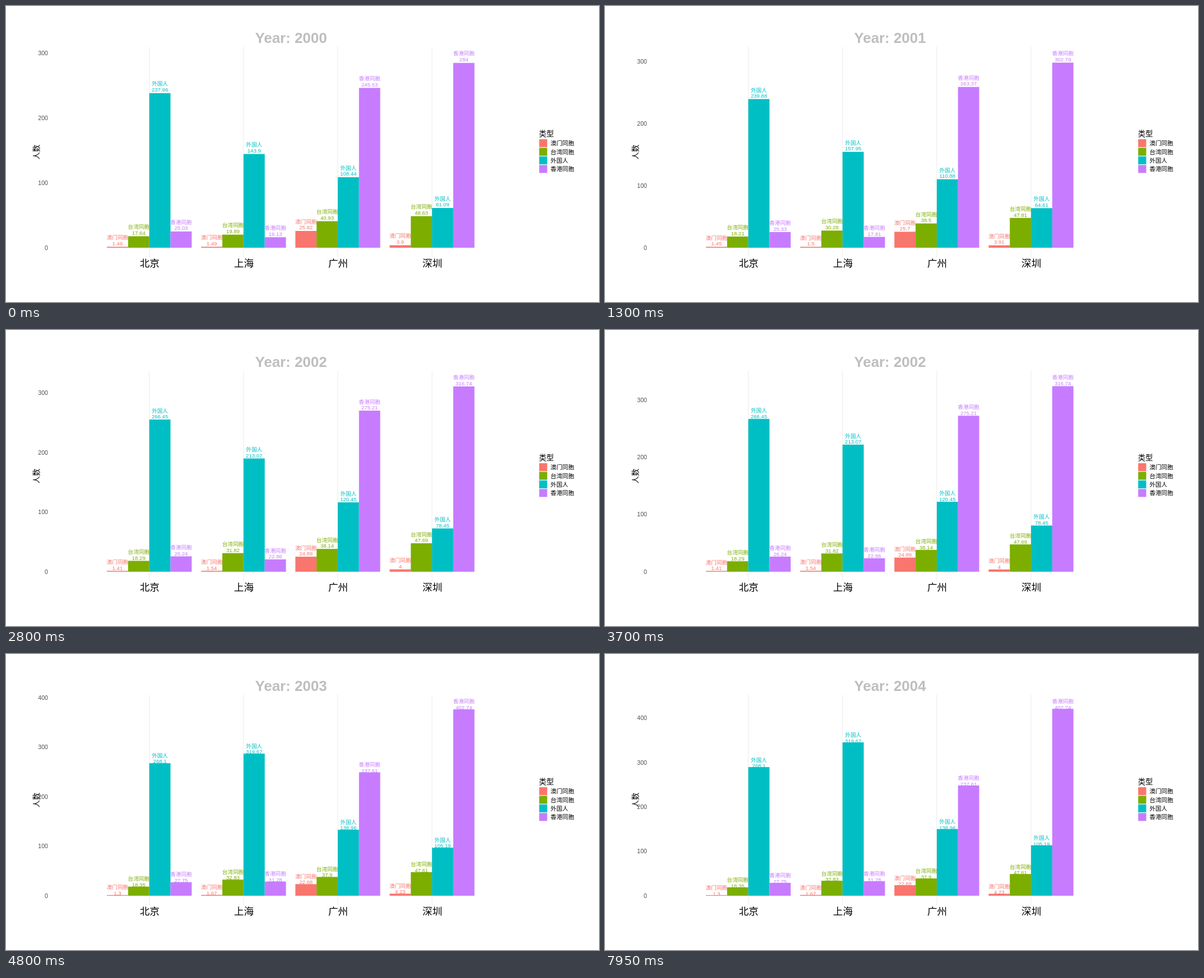
Recreate the animation shown at these times as an HTML page with a canvas. Size 1058x529 px, loop 8000 ms.

```html
<!DOCTYPE html>
<html lang="zh">
<head>
<meta charset="utf-8">
<title>人数</title>
<style>
  html, body { margin: 0; width: 100%; height: 100%; overflow: hidden; background: #fff; }
  canvas { display: block; }
</style>
</head>
<body>
<canvas id="stage" width="1058" height="529"></canvas>
<script>
const ctx = document.getElementById('stage').getContext('2d');

const LOOP = 8000, STEP = 50, STEPS_PER_YEAR = 36, LEAD = 0.95;
const BASE = 432, TOP = 90.1, PANEL_TOP = 72.7, PANEL_BOTTOM = 448.8;
const FIRST_X = 255.65, GROUP_GAP = 168.15, BAR_W = 37.83;
const LABEL_LIFT = 10, LAST_YEAR = 3;
const SANS = '"Liberation Sans", Arial, sans-serif';
const CJK = '"Noto Sans CJK SC", "Noto Sans CJK", "Noto Sans CJK JP", sans-serif';

// bend: how late a change comes; growth: rise after the flat year.
const types = [
  { name: '澳门同胞', color: '#F8766D', bend: 3, growth: 1.1 },
  { name: '台湾同胞', color: '#7CAE00', bend: 0.2, growth: 1.06 },
  { name: '外国人', color: '#00BFC4', bend: 2.3, growth: 1.18 },
  { name: '香港同胞', color: '#C77CFF', bend: 2, growth: 1.1 }
];

// Key points per type, spread evenly from 2000 to 2003.
const cities = [
  { name: '北京', keys: [[1.46, 1.3], [17.64, 18.35], [237.96, 239.88, 266.45, 268.1], [25.03, 27.75]] },
  { name: '上海', keys: [[1.49, 1.67], [19.89, 32.83], [143.9, 319.67], [16.13, 31.28]] },
  { name: '广州', keys: [[25.82, 22.68], [40.93, 37.9], [108.44, 138.96], [245.53, 263.37, 275.21, 237.61]] },
  { name: '深圳', keys: [[3.9, 4.23], [48.63, 47.61], [61.09, 105.19], [284, 302.79, 316.74, 402.74]] }
];

const mix = (a, b, part) => a + (b - a) * part;

// Value in a whole year: the year after the last key is flat, then it grows.
function yearValue(keys, type, year) {
  const at = Math.min(year, LAST_YEAR) * (keys.length - 1) / LAST_YEAR;
  const i = Math.floor(at);
  const value = mix(keys[i], keys[i + 1] ?? keys[i], (at - i) ** type.bend);
  return year > LAST_YEAR + 1 ? value * type.growth : value;
}

function text(str, x, y, size, color, align = 'center', family = SANS, weight = '') {
  ctx.font = `${weight} ${size}px ${family}`;
  ctx.fillStyle = color;
  ctx.textAlign = align;
  ctx.fillText(str, x, y);
}

function rect(x, y, w, h, color) {
  ctx.fillStyle = color;
  ctx.fillRect(x, y, w, h);
}

const cityX = i => FIRST_X + GROUP_GAP * i;

function drawFixed() {
  cities.forEach((city, i) => {
    rect(cityX(i) - 0.5, PANEL_TOP, 1, PANEL_BOTTOM - PANEL_TOP, '#EBEBEB');
    text(city.name, cityX(i) + 0.6, 466.1, 17.6, '#000', 'center', CJK);
  });

  text('类型', 951, 233, 13.2, '#000', 'left', CJK);
  types.forEach((type, i) => {
    const y = 238.1 + 15.35 * i;
    rect(951.3, y, 14.3, 14.2, type.color);
    text(type.name, 971.5, y + 11.3, 10.56, '#000', 'left', CJK);
  });

  ctx.save();
  ctx.translate(58.7, 261);
  ctx.rotate(-Math.PI / 2);
  text('人数', 0, 0, 13.2, '#000', 'center', CJK);
  ctx.restore();
}

function makeBars(pos) {
  const from = Math.floor(pos), near = Math.round(pos);
  return cities.flatMap((city, c) => types.map((type, i) => {
    const inYear = year => yearValue(city.keys[i], type, year);
    return {
      type,
      x: cityX(c) + (i - 2) * BAR_W,
      value: mix(inYear(from), inYear(from + 1), pos - from),
      label: Number(inYear(near).toFixed(2))
    };
  }));
}

function draw(ms) {
  const pos = (Math.floor(ms / STEP) + LEAD) / STEPS_PER_YEAR;
  const bars = makeBars(pos);
  const peak = Math.max(...bars.map(bar => bar.value));
  const scale = (BASE - TOP) / (peak + LABEL_LIFT);
  const toY = v => BASE - v * scale;

  rect(0, 0, 1058, 529, '#fff');
  drawFixed();

  for (let v = 0; toY(v) >= PANEL_TOP; v += 100)
    text(v, 74.9, toY(v) + 3.9, 10.56, '#4D4D4D', 'right');

  for (const { type, x, value } of bars)
    rect(x, toY(value), BAR_W, value * scale, type.color);

  for (const { type, x, value, label } of bars) {
    const mid = x + BAR_W / 2, y = toY(value + LABEL_LIFT);
    text(type.name, mid, y - 1.7, 9.6, type.color, 'center', CJK);
    text(label, mid, y + 8.9, 9.6, type.color);
  }

  text('Year: ' + (2000 + Math.round(pos)), 444.4, 66, 25.9, '#BEBEBE', 'left', SANS, 'bold');
}

const start = performance.now();
function tick() {
  draw((performance.now() - start) % LOOP);
  requestAnimationFrame(tick);
}
tick();
</script>
</body>
</html>
```
